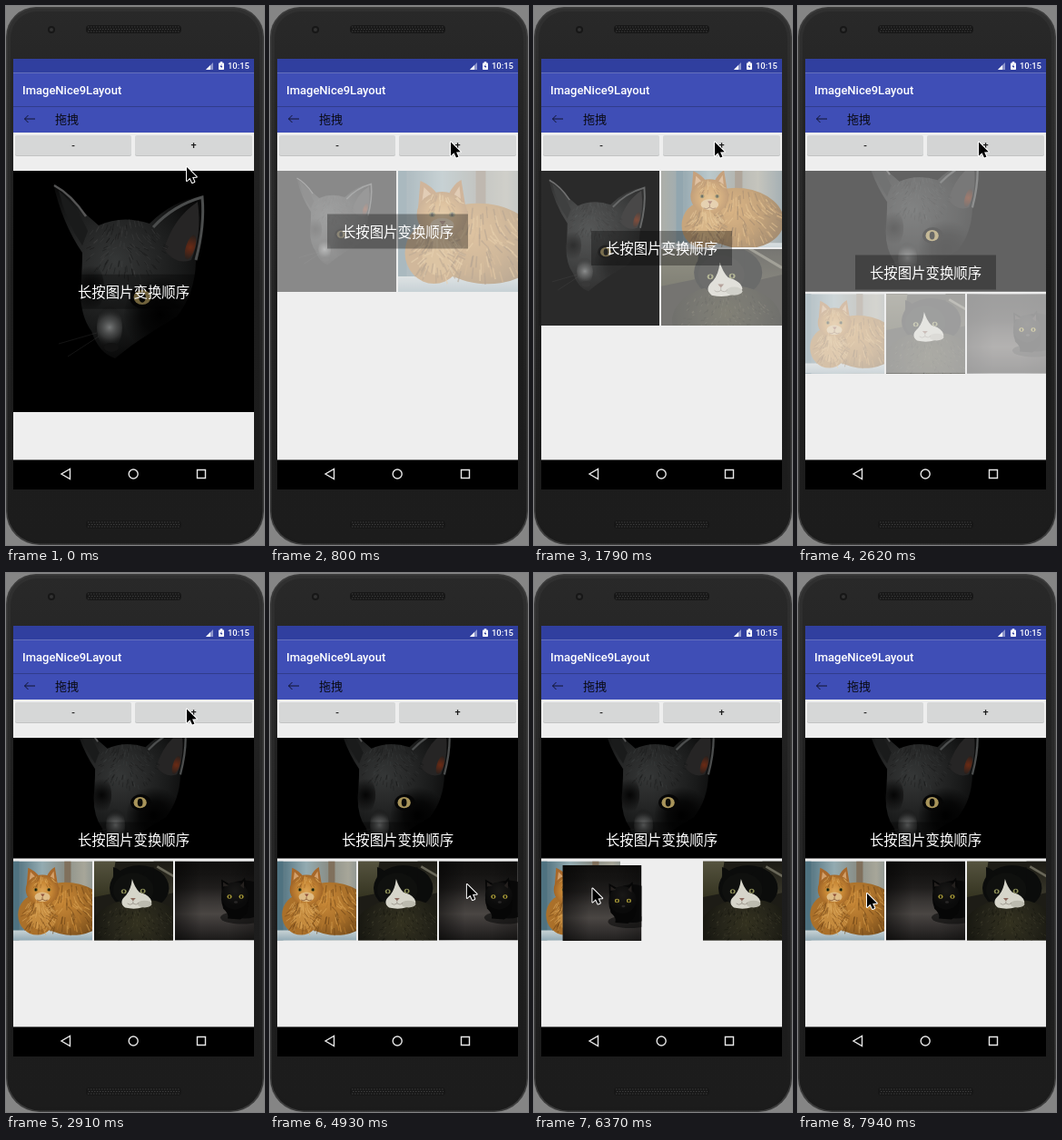
An HTML page with a canvas that plays this animation: 284 px wide and 592 px high, repeating every 8 s.

```html
<!DOCTYPE html>
<html lang="zh">
<head>
<meta charset="utf-8">
<title>ImageNice9Layout</title>
<style>
  html, body { margin: 0; width: 100%; height: 100%; overflow: hidden; background: #858585; }
  canvas { display: block; width: 284px; height: 592px; }
</style>
</head>
<body>
<canvas id="stage" width="284" height="592"></canvas>
<script>
const LOOP = 8000;
const ctx = document.getElementById('stage').getContext('2d');
const LATIN = 'Roboto, sans-serif';
const CJK = '"Noto Sans CJK SC", "Noto Sans CJK", "Noto Sans CJK JP", sans-serif';

const clamp = v => Math.max(0, Math.min(1, v));
const span = (t, start, length) => clamp((t - start) / length);
const mix = (a, b, p) => a + (b - a) * p;
const easeOut = p => 1 - (1 - p) ** 2;
const easeInOut = p => (1 - Math.cos(Math.PI * p)) / 2;

// ---------- drawing helpers ----------
function rect(x, y, w, h, fill, radius = 0) {
  ctx.fillStyle = fill;
  ctx.beginPath();
  ctx.roundRect(x, y, w, h, radius);
  ctx.fill();
}
function ellipse(x, y, rx, ry, fill, turn = 0) {
  ctx.fillStyle = fill;
  ctx.beginPath();
  ctx.ellipse(x, y, rx, ry, turn, 0, 7);
  ctx.fill();
}
function shape(points, fill) {
  ctx.fillStyle = fill;
  ctx.fill(new Path2D('M' + points + 'Z'));
}
function stroke(path, color, width) {
  ctx.strokeStyle = color;
  ctx.lineWidth = width;
  ctx.stroke(new Path2D(path));
}
function text(str, x, y, font, color, align = 'left') {
  ctx.font = font;
  ctx.fillStyle = color;
  ctx.textAlign = align;
  ctx.textBaseline = 'middle';
  ctx.fillText(str, x, y);
}
function fade(gradient, ...colors) {
  colors.forEach((c, i) => gradient.addColorStop(i / (colors.length - 1), c));
  return gradient;
}
const radial = (x, y, r, ...colors) => fade(ctx.createRadialGradient(x, y, 0, x, y, r), ...colors);
const vertical = (y0, y1, ...colors) => fade(ctx.createLinearGradient(0, y0, 0, y1), ...colors);
const horizontal = (x0, x1, ...colors) => fade(ctx.createLinearGradient(x0, 0, x1, 0), ...colors);

function eye(x, y, r, color) {
  ellipse(x, y, r, r * 0.85, color);
  ellipse(x, y, r * 0.4, r * 0.6, '#0b0b08');
}

// Scatters short hairs over an ellipse, pointing away from its centre.
function fur(x, y, rx, ry, count, length, width, colors) {
  let seed = 7;
  const random = () => (seed = seed * 16807 % 2147483647) / 2147483647;
  for (let i = 0; i < count; i++) {
    const angle = random() * 2 * Math.PI, r = Math.sqrt(random());
    const hx = x + rx * r * Math.cos(angle), hy = y + ry * r * Math.sin(angle);
    const dx = length * Math.cos(angle), dy = length * (0.4 + Math.abs(Math.sin(angle)));
    stroke(`M${hx},${hy}l${dx},${dy}`, colors[i % colors.length], width);
  }
}

// ---------- pictures: natural size and painter ----------
const grayCat = { w: 353, h: 265, paint() {
  rect(0, 0, 353, 265, '#000');
  ctx.translate(44, 0);
  shape('44,14Q62,24 78,46L94,60Q120,48 150,58Q175,33 209,27Q213,62 201,100Q200,135 180,160Q150,178 130,192L112,206Q94,200 86,176Q74,160 74,132Q76,108 76,90Q54,58 44,14',
    radial(112, 100, 108, '#353737', '#282929', '#191a1a', '#080808'));
  shape('50,22Q68,36 82,66L76,82Q58,56 50,22', '#1a1b1b');
  stroke('M45,16Q64,26 80,50', '#555', 2.5);
  shape('203,34Q208,70 196,98Q178,104 166,86Q176,52 203,34', '#262525');
  stroke('M154,62Q176,38 208,29Q211,60 201,98', '#4b4d4d', 3);
  ellipse(195, 84, 5, 14, radial(195, 84, 14, '#6b2a14', '#26201d'), 0.3);
  fur(122, 84, 44, 32, 130, 5, 0.8, ['#50525255', '#0e0e0e77']);
  ellipse(162, 158, 40, 42, radial(162, 158, 42, '#000', '#000000bb', '#0000'));
  ellipse(86, 128, 14, 26, radial(86, 128, 24, '#050505', '#0000'));
  ellipse(106, 172, 14, 24, radial(106, 172, 24, '#777979', '#4a4b4b99', '#0000'));
  ellipse(108, 194, 8, 5, '#121212');
  ellipse(143, 139, 15, 12, '#060606');
  eye(142, 139, 9.5, '#a8945a');
  stroke('M92,178L50,190M94,182L60,204', '#5556', 0.6);
} };

const orangeCat = { w: 177, h: 133, paint() {
  rect(0, 0, 177, 133, horizontal(0, 177, '#7f8177', '#5d7c88', '#93abb1', '#8a8f88', '#a7a699', '#71838a'));
  rect(22, 0, 10, 133, '#4f7280');
  rect(108, 0, 11, 60, '#80705c');
  rect(0, 116, 177, 17, vertical(116, 133, '#c9d3d5', '#93abb6'));
  ellipse(116, 80, 64, 44, radial(104, 68, 74, '#c98938', '#a9702a', '#714818'), 0.12);
  ellipse(62, 90, 32, 34, '#aa702a');
  fur(112, 76, 60, 38, 170, 9, 1.6, ['#dda65499', '#6b431799', '#b97c3099']);
  shape('44,47L47,11Q59,16 67,27L78,26Q84,14 92,10L98,47', '#a8682a');
  shape('49,33L51,18L62,29ZM83,28L90,17L92,36', '#d3a06a');
  ellipse(71, 48, 28, 25, radial(71, 50, 29, '#dca352', '#c88836', '#9d6225'));
  fur(71, 34, 20, 10, 30, 5, 1.2, ['#e8b86a99', '#8a551f99']);
  ellipse(71, 60, 13, 8, '#dfbc85');
  ellipse(66, 92, 17, 23, '#c58b3e');
  fur(64, 90, 26, 26, 80, 8, 1.5, ['#e0ad6199', '#7a4c1a99']);
  eye(60, 48, 3.3, '#6f6426');
  eye(82, 48, 3.3, '#6f6426');
  shape('68,55H75L71.5,60', '#91543d');
  stroke('M71,60V64M71,64Q66,68 62,65M71,64Q76,68 80,65', '#744222', 1);
} };

const tuxedoCat = { w: 177, h: 133, paint() {
  rect(0, 0, 177, 133, '#1d1c16');
  shape('0,0H58L49,55L0,65', vertical(0, 65, '#55533f', '#33321f'));
  shape('122,0H177V48L130,59', vertical(0, 60, '#1b1a14', '#3b392c'));
  stroke('M128,9L177,38', '#6a685a', 4);
  ellipse(98, 45, 50, 38, '#0b0c0b');
  ellipse(96, 115, 80, 52, radial(95, 104, 80, '#33311f', '#26251a', '#15150f'));
  fur(94, 112, 70, 40, 200, 3, 1.4, ['#4a473577', '#12120c88']);
  shape('55,51L54,10Q65,13 75,25L102,24Q113,12 122,10L122,51', '#0b0c0b');
  ellipse(88, 48, 34, 28, '#0f100e');
  shape('86,30Q90,44 98,52Q118,58 119,69Q100,84 74,78Q62,69 76,57Q84,48 86,30', '#d6d5ca');
  ellipse(107, 72, 12, 6, '#bcbbaf');
  eye(72, 51, 4.5, '#8b8e58');
  eye(104, 50, 4.5, '#8b8e58');
  shape('83,62H92L87.5,67', '#8c6a5e');
  stroke('M87.5,67V71Q82,75 78,71M87.5,71Q93,75 97,70', '#7d756c', 0.9);
} };

const blackCat = { w: 87, h: 87, paint() {
  rect(0, 0, 87, 87, vertical(0, 87, '#100f0e', '#151413', '#1f1d1c', '#383533', '#4a4643', '#33302f', '#1b1a19'));
  rect(0, 0, 87, 87, horizontal(0, 87, '#0007', '#0000', '#0000', '#0004'));
  ellipse(74, 62, 24, 7, '#0a0a0a99');
  ellipse(77, 42, 26, 21, '#080808');
  shape('52,44L51,20L60,25H70L77,18L81,44Q82,58 72,64L58,63Q60,58 53,52', '#060606');
  ellipse(66, 38, 15, 15, radial(66, 33, 16, '#191817', '#0a0a0a'));
  shape('53,28L53,23L59,27ZM72,27L76,22L76,30', '#24201e');
  eye(60, 39, 2.6, '#a89a38');
  eye(73, 39, 2.6, '#a89a38');
  ellipse(67, 45, 2, 1.2, '#292727');
} };

// Centre-crops a picture into a box.
function photo(pic, x, y, w, h, alpha = 1) {
  const scale = Math.max(w / pic.w, h / pic.h);
  // Paint opaque on a layer first, so that overlapping parts fade as one.
  ctx.save();
  ctx.beginPath();
  ctx.rect(x, y, w, h);
  ctx.clip();
  ctx.save();
  ctx.translate(x + (w - pic.w * scale) / 2, y + (h - pic.h * scale) / 2);
  ctx.scale(scale, scale);
  pic.paint();
  ctx.restore();
  ctx.globalAlpha = 1 - alpha;
  rect(x, y, w, h, PAGE);
  ctx.restore();
}

// ---------- phone and app chrome ----------
const PAGE = '#eee';

function grille(y) {
  rect(88, y, 105, 9, '#171717', 4);
  ctx.setLineDash([1.5, 1.5]);
  for (let i = 0; i < 3; i++) stroke(`M${90 + i % 2},${y + 2 + i * 2.5}H191`, '#3d3d3d', 1);
  ctx.setLineDash([]);
}
function phone() {
  rect(0, 0, 284, 592, '#858585');
  rect(0, 1, 284, 591, '#3c3c3c', [33, 33, 37, 37]);
  rect(1.5, 2.5, 281, 588, vertical(0, 592, '#303030', '#252525', '#1b1b1b'), [32, 32, 36, 36]);
  rect(5, 6, 274, 581, vertical(0, 592, '#292929', '#1d1d1d', '#1c1c1c'), [29, 29, 33, 33]);
  ellipse(50, 26, 4, 4, '#171717');
  ellipse(50, 26, 2, 2, '#333');
  grille(21);
  grille(565);
}
function button(x, w, label) {
  rect(x, 143, w, 22, '#c2c3c3', 2);
  rect(x, 142, w, 22, '#d6d7d7', 2);
  text(label, x + w / 2, 154, '500 11px ' + LATIN, '#1a1a1a', 'center');
}
function app() {
  rect(8, 58, 265, 473, PAGE);
  rect(8, 58, 265, 15.5, '#303f9f');
  rect(8, 73.5, 265, 65.5, '#3f4eb6');
  rect(8, 110, 265, 1, '#303c8c');
  shape('228,62V70H220', '#8c95cb');
  shape('225,65V70H220', '#fff');
  rect(234, 62.5, 6, 7.5, '#fff', 0.7);
  rect(235.7, 61.2, 2.6, 2, '#fff');
  shape('237.5,63.5L235.7,67H237L236.6,69L238.4,66H237.2', '#303f9f');
  text('10:15', 268, 66.3, '500 9.5px ' + LATIN, '#fff', 'right');
  text('ImageNice9Layout', 18, 93, '500 13px ' + LATIN, '#fff');
  stroke('M32,124H20.5M24.5,120L20.5,124L24.5,128', '#10132e', 1);
  text('拖拽', 54, 124.5, '13px ' + CJK, '#0a0b14');
  button(10, 128, '-');
  button(142, 129, '+');

  rect(8, 498.5, 265, 32.5, '#000');
  stroke('M70.5,508.5V519.5L61,514Z', '#e8e8e8', 1.4);
  stroke('M145.2,514A5,5 0 1 1 135.2,514A5,5 0 1 1 145.2,514Z', '#e8e8e8', 1.4);
  stroke('M210.5,509.5H219.5V518.5H210.5Z', '#e8e8e8', 1.4);
}

// ---------- motion ----------
const PRESSES = [580, 1500, 2440];
const LAYOUTS = [610, 1530, 2460];
const FADE = 450;
const GRAB = 4930, DROP = 7430;
const SLOTS = [8, 97, 186], ROW = 316.5, SIDE = 87;

// Cursor waypoints: time, x, y.
const WAYPOINTS = [
  [50, 199, 177], [550, 199, 149.5], [3750, 199, 149.5], [3930, 218, 225],
  [4080, 225, 305], [4210, 217, 342], [GRAB, 217, 342], [5220, 183, 343],
  [5510, 144, 343], [5710, 124, 343], [6010, 124, 343], [6370, 64.5, 346.5],
  [6650, 42, 344.5], [7010, 42, 344.5], [7190, 102, 345], [7600, 102, 345],
  [7940, 76, 352]
];
function cursorAt(t) {
  const next = WAYPOINTS.findIndex(w => w[0] > t);
  if (next === 0) return WAYPOINTS[0].slice(1);
  if (next < 0) return WAYPOINTS.at(-1).slice(1);
  const [t0, x0, y0] = WAYPOINTS[next - 1], [t1, x1, y1] = WAYPOINTS[next];
  const p = (t - t0) / (t1 - t0);
  return [mix(x0, x1, p), mix(y0, y1, p)];
}
function draggedAt(t) {
  if (t < GRAB) return [SLOTS[2], ROW];
  const [x, y] = cursorAt(Math.min(t, DROP));
  const home = easeInOut(span(t, DROP, 250));
  const lift = span(t, GRAB, 200);
  return [mix(x - mix(31, 33, lift), SLOTS[1], home), mix(y - 25.5, ROW, home)];
}

function gallery(t) {
  const stage = LAYOUTS.filter(start => t >= start).length;
  const alpha = stage ? span(t, LAYOUTS[stage - 1], FADE) : 1;
  // From the second change on, the first picture cross-fades and so appears sooner.
  const firstAlpha = stage > 1 ? easeOut(alpha) : alpha;
  const bottom = [446.5, 314, 351, 404][stage];
  if (stage === 0) photo(grayCat, 8, 181, 265, 265);
  if (stage === 1) {
    photo(grayCat, 8, 181, 131, 133, firstAlpha);
    photo(orangeCat, 141, 181, 132, 133, alpha);
  }
  if (stage === 2) {
    photo(grayCat, 8, 181, 130, 170, firstAlpha);
    photo(orangeCat, 140, 181, 133, 84, alpha);
    photo(tuxedoCat, 140, 267, 133, 84, alpha);
  }
  if (stage === 3) {
    const swap = easeInOut(span(t, 5510, 250));
    ctx.save();
    ctx.beginPath();
    ctx.rect(8, 181, 265, 223);
    ctx.clip();
    photo(grayCat, 8, 181, 265, 132.5, firstAlpha);
    photo(orangeCat, SLOTS[0], ROW, SIDE, SIDE, alpha);
    photo(tuxedoCat, mix(SLOTS[1], SLOTS[2], swap), ROW, SIDE, SIDE, alpha);
    photo(blackCat, ...draggedAt(t), SIDE, SIDE, alpha);
    ctx.restore();
  }
  const middle = (181 + bottom) / 2;
  rect(63, middle - 19, 155, 38, 'rgba(0,0,0,.33)');
  text('长按图片变换顺序', 140.5, middle + 0.5, '15.4px ' + CJK, '#fff', 'center');
}

function ripples(t) {
  for (const start of PRESSES) {
    const p = span(t, start, 200);
    if (p === 0 || p === 1) continue;
    ctx.save();
    ctx.beginPath();
    ctx.roundRect(142, 142, 129, 22, 2);
    ctx.clip();
    ellipse(200, 153, 80 * easeOut(p), 80 * easeOut(p), `rgba(0,0,0,${0.14 * (1 - p)})`);
    ctx.restore();
  }
}

function cursor(t) {
  const arrow = '0,0V15L3.5,11.8L6,17L8.4,16L6.1,10.9L10.8,10.7';
  ctx.save();
  ctx.translate(...cursorAt(t));
  ctx.lineJoin = 'round';
  stroke('M' + arrow + 'Z', '#fff', 2);
  shape(arrow, '#000');
  ctx.restore();
}

function frame(now) {
  const t = now % LOOP;
  phone();
  app();
  ripples(t);
  gallery(t);
  cursor(t);
  requestAnimationFrame(frame);
}
requestAnimationFrame(frame);
</script>
</body>
</html>
```
